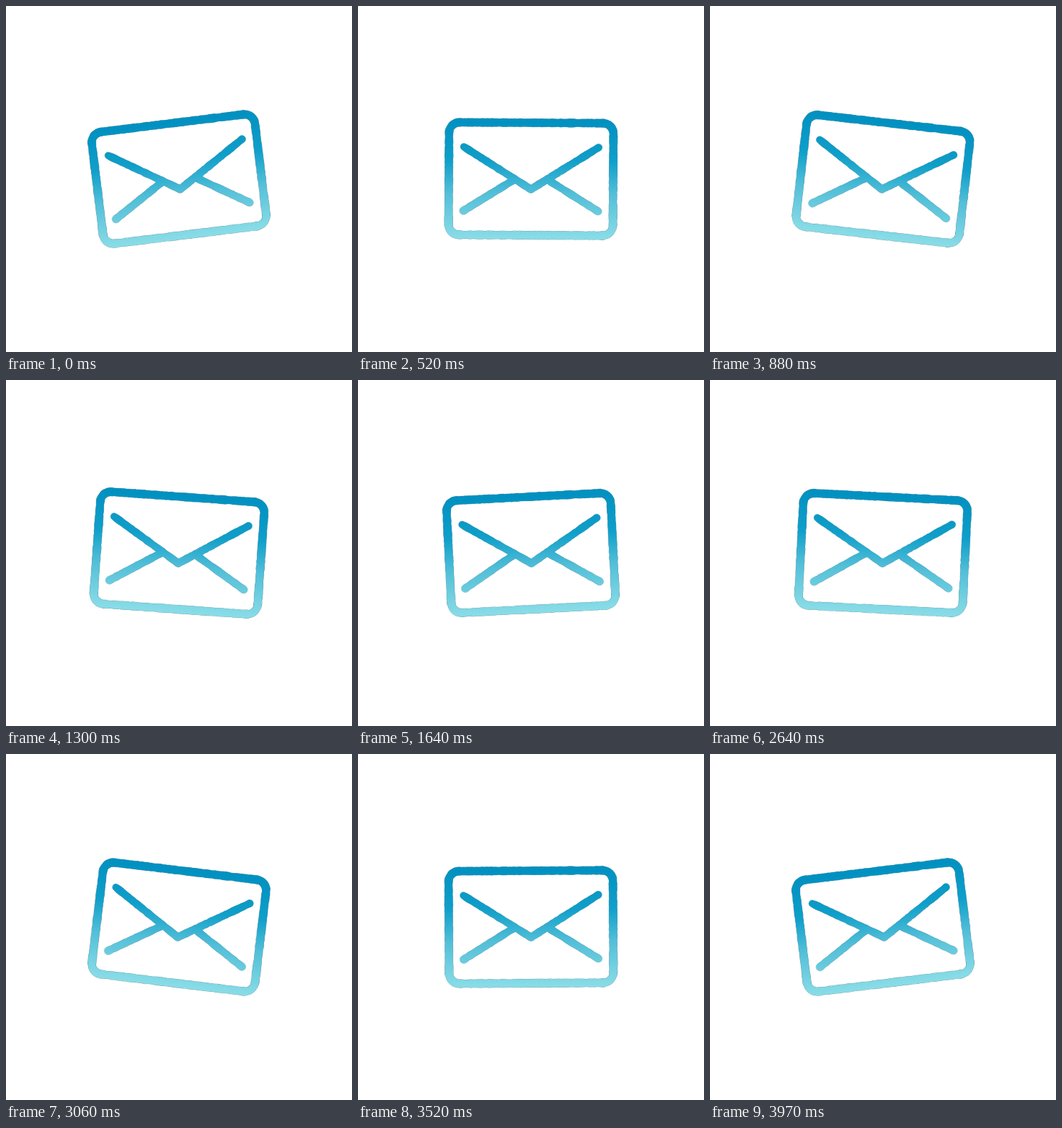
Write an HTML page with a canvas that moves like this. It is 480 by 480 pixels and loops after 4000 ms.

```html
<!DOCTYPE html>
<html lang="en">
<head>
<meta charset="utf-8">
<title>Envelope</title>
<style>
html, body { margin: 0; width: 100%; height: 100%; overflow: hidden; background: #fff; }
canvas { display: block; width: 480px; height: 480px; }
</style>
</head>
<body>
<canvas id="stage" width="480" height="480"></canvas>
<script>
const ctx = document.getElementById('stage').getContext('2d');
const LOOP = 4000, FRAMES = 132, SWING = 7;
const shape = new Path2D();

let seed = 7;
function rand() {
  seed = (seed * 16807) % 2147483647;
  return seed / 2147483647;
}

// Round dabs of slightly uneven size give the strokes a rough edge.
function dab(x, y, r) {
  const size = r + (rand() - 0.6) * 0.9;
  shape.moveTo(x + size, y);
  shape.arc(x, y, size, 0, Math.PI * 2);
}

function line(x1, y1, x2, y2, r) {
  const n = Math.ceil(Math.hypot(x2 - x1, y2 - y1) / 1.6);
  for (let i = 0; i <= n; i++) {
    dab(x1 + (x2 - x1) * i / n, y1 + (y2 - y1) * i / n, r);
  }
}

function corner(cx, cy, radius, start, r) {
  for (let i = 0; i <= 14; i++) {
    const a = start + Math.PI / 2 * i / 14;
    dab(cx + radius * Math.cos(a), cy + radius * Math.sin(a), r);
  }
}

function buildEnvelope() {
  const w = 114, h = 78, c = 14.5, r = 5.6;
  for (const s of [-1, 1]) {
    line(-w + c, s * h, w - c, s * h, r);
    line(s * w, -h + c, s * w, h - c, r);
  }
  corner(w - c, h - c, c, 0, r);
  corner(c - w, h - c, c, Math.PI / 2, r);
  corner(c - w, c - h, c, Math.PI, r);
  corner(w - c, c - h, c, Math.PI * 1.5, r);
  for (const s of [-1, 1]) {
    line(s * 93.5, -44.2, 0, 14.3, 5.2);
    line(s * 93.5, 44.5, s * 22, 0.2, 5.2);
  }
}

buildEnvelope();

const paint = ctx.createLinearGradient(0, -84, 0, 84);
paint.addColorStop(0, '#0090c0');
paint.addColorStop(0.35, '#0f9fca');
paint.addColorStop(0.62, '#52bfd8');
paint.addColorStop(1, '#8adde7');

function draw(now) {
  const frame = Math.floor(((now + 5) % LOOP) / LOOP * FRAMES);
  const angle = -SWING * Math.cos(frame / FRAMES * Math.PI * 4);
  ctx.setTransform(1, 0, 0, 1, 0, 0);
  ctx.fillStyle = '#fff';
  ctx.fillRect(0, 0, 480, 480);
  ctx.translate(240, 240);
  ctx.rotate(angle * Math.PI / 180);
  ctx.lineWidth = 0.8;
  ctx.strokeStyle = 'rgba(0, 70, 90, 0.3)';
  ctx.stroke(shape);
  ctx.fillStyle = paint;
  ctx.fill(shape);
}

const begin = performance.now();
function tick() {
  draw(performance.now() - begin);
  requestAnimationFrame(tick);
}
tick();
</script>
</body>
</html>
```
